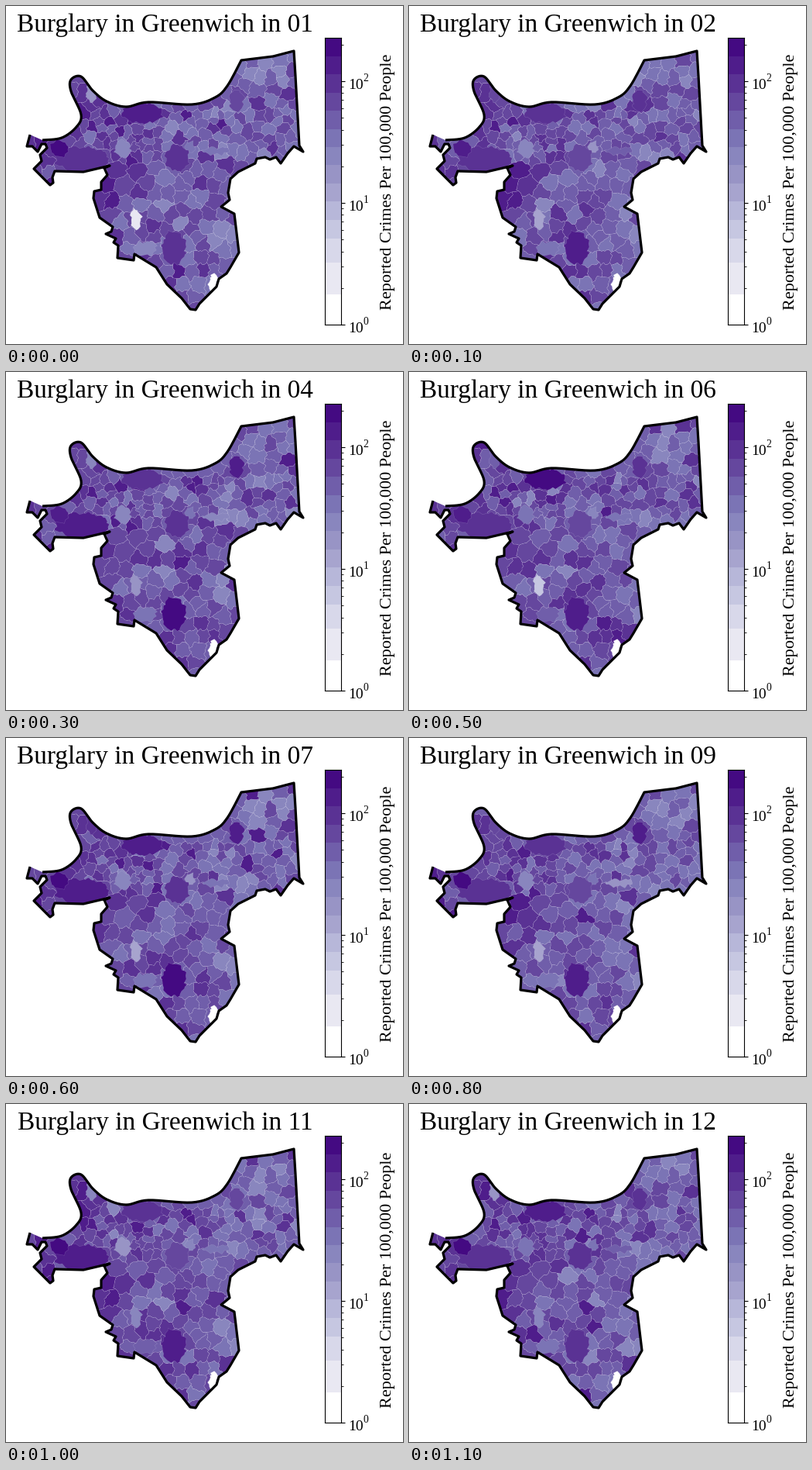
Recreate the animation shown at these times as a matplotlib script. Size 513 px wide and 436 px high, loop 1200 ms.

```python
import numpy as np
import matplotlib.pyplot as plt
from matplotlib.animation import FuncAnimation
from matplotlib.collections import PolyCollection
from matplotlib.patches import PathPatch
from matplotlib.path import Path

W, H, DPI = 513, 436, 100
MONTHS = 12
VMAX = 226
BAR_TOP, BAR_BASE = 41.5, 411
DECADE = (BAR_BASE - BAR_TOP) / np.log10(VMAX)

plt.rcParams["font.family"] = "Liberation Serif"

# Colour bands, as fractions of the logarithmic scale
EDGES = np.array([0, .106, .217, .30, *np.linspace(.366, 1, 11)])
BANDS = plt.cm.Purples((EDGES[:-1] + EDGES[1:]) / 2)
BANDS[0] = 1

# Key points of the river bank (smoothed) and the land border (straight)
RIVER = [
    (47, 173), (72, 170), (91, 156), (97, 140), (84, 110), (84, 95), (97, 91),
    (112, 109), (130, 123), (155, 130), (184, 124), (240, 127), (270, 118),
    (286, 103), (304, 70)]
EAST = [
    (345, 65), (372, 58), (374, 90), (379, 180), (384, 188), (372, 181),
    (364, 190), (355, 203), (349, 195), (341, 198), (335, 195), (324, 197),
    (322, 203), (300, 214), (290, 223), (287, 241), (289, 250), (278, 259),
    (295, 268), (301, 318), (290, 337), (285, 345), (275, 352), (272, 362),
    (250, 384), (245, 392), (238, 391)]
WEST = [
    (227, 377), (208, 359), (194, 337), (166, 320), (165, 328), (144, 325),
    (145, 309), (139, 305), (142, 300), (129, 294), (136, 291), (138, 285),
    (121, 273), (113, 248), (114, 239), (123, 237), (123, 227), (131, 218),
    (127, 209), (134, 206), (100, 214), (63, 213), (60, 221), (61, 228),
    (57, 231), (47, 221), (36, 210), (46, 200), (44, 192), (53, 183),
    (51, 178), (46, 178), (41, 188), (34, 181), (27, 181), (31, 166)]

# Standout areas: x, y, width, height, usual band, monthly spread
AREAS = [
    (98, 198, 68, 32, 11, .7),
    (69, 184, 24, 20, 12.6, .5),
    (176, 138, 52, 26, 11.8, .6),
    (221, 196, 30, 34, 10.6, .5),
    (151, 184, 20, 22, 6.8, .8),
    (238, 182, 11, 16, 7.5, 1.2),
    (272, 187, 34, 9, 7.5, 1.5),
    (298, 122, 18, 28, 11, 1),
    (110, 112, 12, 26, 8, 1.5),
    (217, 312, 30, 42, 11.5, .7),
    (180, 313, 28, 18, 7.5, 1.5),
    (168, 275, 13, 25, 5, 1.8),
    (268, 359, 11, 27, 0, 0),
]


def smooth(keys, n=8):
    """Catmull-Rom curve through the keys."""
    k = np.array([keys[0], *keys, keys[-1]], float)
    t = np.arange(n)[:, None] / n
    parts = [b + (c - a) * t / 2 + (2 * a - 5 * b + 4 * c - d) * t**2 / 2
             + (3 * b - a - 3 * c + d) * t**3 / 2
             for a, b, c, d in zip(k, k[1:], k[2:], k[3:])]
    return np.vstack([*parts, k[-1:]])


OUTLINE = Path(np.vstack([smooth(RIVER), EAST, WEST]))


def scatter_sites(rng, tries=5000):
    """Random sites, closer together in the town belt."""
    sites = []
    for x, y in rng.uniform((25, 55), (386, 394), (tries, 2)):
        if not OUTLINE.contains_point((x, y)):
            continue
        belt = x > 100 and 130 < y < 195
        gap = (11 if belt else 17) * rng.uniform(.65, 1.15)
        if all(np.hypot(x - a, y - b) > gap for a, b in sites):
            sites.append((x, y))
    return np.array(sites)


def cut(poly, mid, normal):
    """Keep the part of poly behind the line through mid."""
    side = [(p - mid) @ normal for p in poly]
    kept = []
    for i, p in enumerate(poly):
        q, a, b = poly[i - 1], side[i - 1], side[i]
        if (a < 0) != (b < 0):
            kept.append(q + (p - q) * a / (a - b))
        if b <= 0:
            kept.append(p)
    return kept


def voronoi(sites):
    box = [np.array(p, float) for p in ((0, 0), (W, 0), (W, H), (0, H))]
    cells = []
    for s in sites:
        poly = box
        order = np.argsort(np.hypot(*(sites - s).T))
        for t in sites[order[1:50]]:
            poly = cut(poly, (s + t) / 2, t - s)
        cells.append(np.array(poly))
    return cells


def blob(x, y, w, h):
    a = np.pi * (np.arange(8) + .5) / 4
    return np.column_stack([x + w * .54 * np.cos(a), y + h * .54 * np.sin(a)])


def roughen(poly, step=2.5):
    """Subdivide the sides and bend them with a shared ripple field."""
    pts = []
    for p, q in zip(poly, np.roll(poly, -1, axis=0)):
        n = max(1, int(np.hypot(*(q - p)) / step))
        pts.extend(p + (q - p) * k / n for k in range(n))
    x, y = np.array(pts).T
    dx = 1.2 * np.sin(.43 * y + .17 * x) + np.sin(.81 * y - .35 * x + 1)
    dy = 1.2 * np.sin(.39 * x - .21 * y + 2) + np.sin(.77 * x + .3 * y)
    return np.column_stack([x + dx, y + dy])


rng = np.random.default_rng(7)
sites = scatter_sites(rng)
areas = np.array(AREAS)
shapes = [roughen(p) for p in voronoi(sites) + [blob(*a[:4]) for a in areas]]

# Darker to the west, paler to the east and in the north-east corner
sx, sy = sites.T
usual = 9.7 + rng.normal(0, .7, len(sites)) + np.clip((190 - sx) / 140, -.7, .8)
usual -= 1.3 * np.exp(-((sx - 330) ** 2 + (sy - 85) ** 2) / 900)


def levels(month):
    noise = np.random.default_rng(100 + month)
    cells = np.clip(usual + noise.normal(0, .85, len(sites)), 6.6, 12)
    special = areas[:, 4] + areas[:, 5] * noise.normal(0, 1, len(areas))
    return np.clip(np.rint([*cells, *special]), 0, 13).astype(int)


fig = plt.figure(figsize=(W / DPI, H / DPI), dpi=DPI, facecolor="white")

ax = fig.add_axes([0, 0, 1, 1])
ax.set(xlim=(0, W), ylim=(H, 0))
ax.axis("off")
border = PathPatch(OUTLINE, fc="none", ec="black", lw=2.3, zorder=3,
                   joinstyle="round")
ax.add_patch(border)
wards = PolyCollection(shapes, edgecolors=[(.85, .84, .94, .25)],
                       linewidths=.35)
ax.add_collection(wards, autolim=False)
wards.set_clip_path(border)

title = ax.text(205.5, 33, "", fontsize=24, ha="center", va="baseline")
ax.text(498, 226.5, "Reported Crimes Per 100,000 People", fontsize=16,
        rotation=90, rotation_mode="anchor", ha="center", va="baseline")
for k in range(3):
    base = BAR_BASE - k * DECADE + 9.5
    ax.text(442, base, "10", fontsize=14)
    ax.text(461.5, base - 10, str(k), fontsize=9.8)

bar = fig.add_axes([412 / W, (H - BAR_BASE) / H,
                    20.5 / W, (BAR_BASE - BAR_TOP) / H])
bar.set_yscale("log")
bar.set_xticks([])
for lo, hi, color in zip(EDGES, EDGES[1:], BANDS):
    bar.axhspan(VMAX ** lo, VMAX ** hi, fc=color, lw=0)
bar.set_ylim(1, VMAX)
bar.yaxis.tick_right()
bar.tick_params(which="both", labelright=False)


def draw(i):
    wards.set_facecolor(BANDS[levels(i + 1)])
    title.set_text(f"Burglary in Greenwich in {i + 1:02d}")
    return wards, title


anim = FuncAnimation(fig, draw, frames=MONTHS, interval=100, repeat=True)
plt.show()
```
